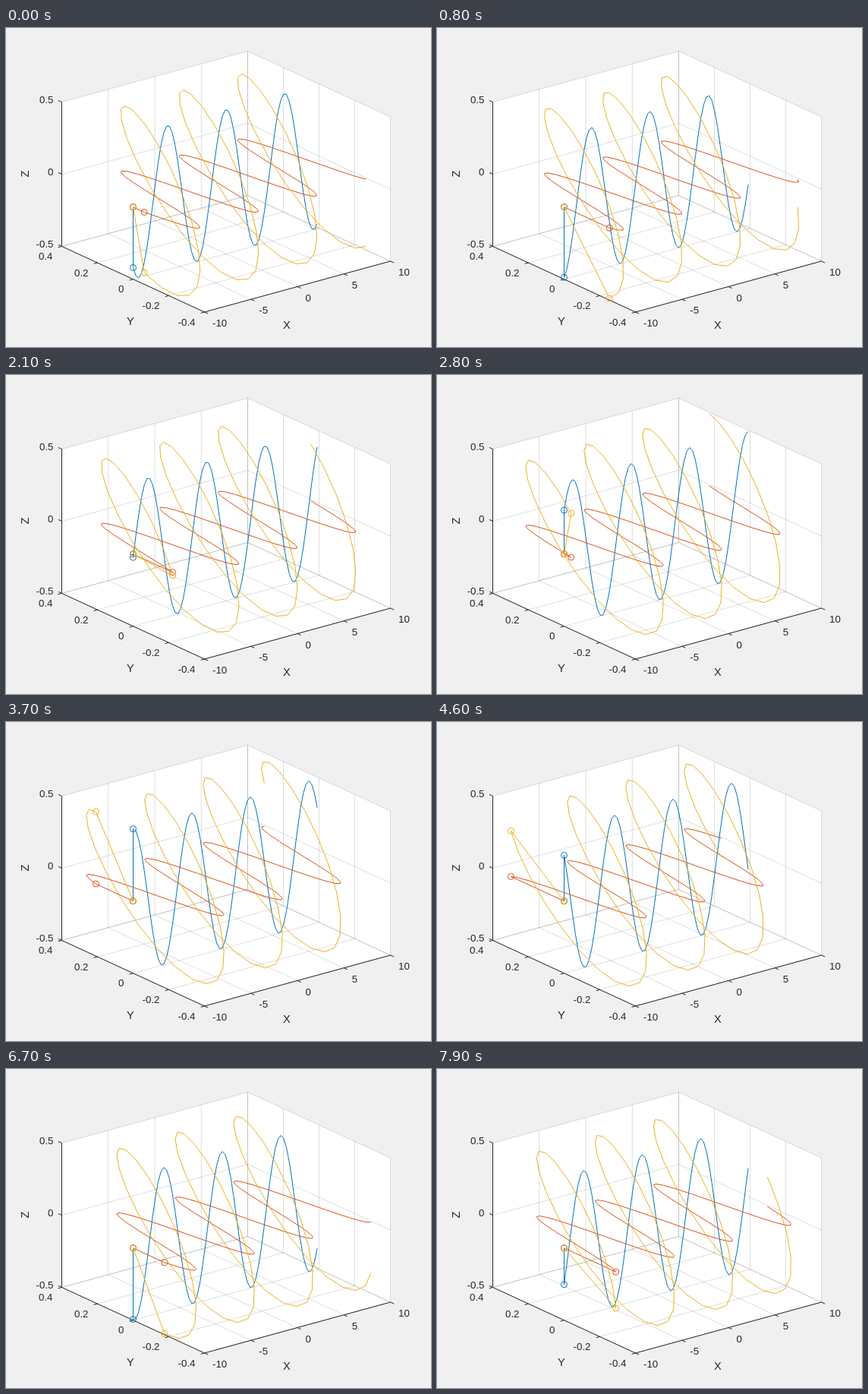
An HTML page that plays this animation: 560x420 px, repeating every 8000 ms.

```html
<!DOCTYPE html>
<html lang="en">
<head>
<meta charset="utf-8">
<title>Elliptically polarised wave</title>
<style>
html, body { margin: 0; width: 560px; height: 420px; overflow: hidden; background: #f0f0f0; }
svg { display: block; fill: none; }
text { font: 13.33px "Liberation Sans", Arial, sans-serif; fill: #262626; dominant-baseline: central; }
.name { font-size: 14.67px; text-anchor: middle; }
</style>
</head>
<body>
<svg width="560" height="420">
  <path id="box" fill="#fff"/>
  <g id="grid" stroke="#262626" stroke-opacity=".15"></g>
  <g id="axes" stroke="#262626"></g>
  <g id="labels">
    <text class="name" x="370" y="391">X</text>
    <text class="name" x="164" y="386">Y</text>
    <text class="name" transform="translate(25 192) rotate(-90)">Z</text>
  </g>
  <g id="waves" stroke-linejoin="round"></g>
</svg>
<script>
const $ = id => document.getElementById(id);

function add(parent, tag, attrs) {
  const el = document.createElementNS("http://www.w3.org/2000/svg", tag);
  for (const key in attrs) el.setAttribute(key, attrs[key]);
  return parent.appendChild(el);
}

// Orthographic view of x -10..10, y -0.4..0.4, z -0.5..0.5
const project = (x, y, z) => {
  const u = (x + 10) / 20, v = (0.4 - y) / 0.8;
  return [73.5 + 245 * u + 188 * v, 287.5 - 67 * u + 86.5 * v - 190 * (z + 0.5)];
};
const path = points => "M" + points.map(p => p.map(c => c.toFixed(2))).join("L");
const line = (group, ...points) => add(group, "path", { d: path(points) });

function label(text, [x, y], anchor) {
  add($("labels"), "text", { x, y, "text-anchor": anchor }).textContent = text;
}
function tick([x, y], dx, dy) {
  line($("axes"), [x, y], [x + dx, y + dy]);
}

const left = project(-10, 0.4, -0.5), front = project(-10, -0.4, -0.5),
      right = project(10, -0.4, -0.5), leftTop = project(-10, 0.4, 0.5);
$("box").setAttribute("d", path([left, leftTop, project(10, 0.4, 0.5),
  project(10, -0.4, 0.5), right, front]) + "Z");

for (const x of [-10, -5, 0, 5, 10]) {
  const a = project(x, 0.4, -0.5), b = project(x, -0.4, -0.5);
  line($("grid"), project(x, 0.4, 0.5), a);
  line($("grid"), a, b);
  tick(b, 4.7, 2.1);
  label(x, [b[0] + 10.5, b[1] + 14.5], "start");
}
for (const y of [0.4, 0.2, 0, -0.2, -0.4]) {
  const a = project(10, y, -0.5), b = project(-10, y, -0.5);
  line($("grid"), project(10, y, 0.5), a);
  line($("grid"), a, b);
  tick(b, -4.8, 1.3);
  label(y, [b[0] - 12, b[1] + 13], "end");
}
for (const z of [-0.5, 0, 0.5]) {
  const a = project(-10, 0.4, z), b = project(10, 0.4, z);
  line($("grid"), a, b);
  line($("grid"), b, project(10, -0.4, z));
  tick(a, -4.6, -2.1);
  label(z, [a[0] - 11, a[1] - 3.5], "end");
}
line($("axes"), leftTop, left, front, right);

// Each wave shows the y and/or z component of the field
const origin = project(-10, 0, 0);
const waves = [["#0072bd", 0, 1], ["#d95319", 1, 0], ["#edb120", 1, 1]].map(([stroke, hasY, hasZ]) => {
  const group = add($("waves"), "g", { stroke });
  const ring = ([cx, cy]) => add(group, "circle", { cx, cy, r: 4 });
  ring(origin);
  return { hasY, hasZ, curve: add(group, "path"), arm: add(group, "path"), tip: ring(origin) };
});

const STEP_MS = 100, STEPS = 80;
let shown = -1;

function draw(step) {
  const t = step * 0.1;
  for (const { hasY, hasZ, curve, arm, tip } of waves) {
    const points = Array.from({ length: 67 }, (_, i) => {
      const x = -10 + 0.3 * i;
      return project(x, hasY * 0.3 * Math.cos(x + t - Math.PI / 4), hasZ * 0.5 * Math.cos(x + t));
    });
    curve.setAttribute("d", path(points));
    arm.setAttribute("d", path([origin, points[0]]));
    tip.setAttribute("cx", points[0][0]);
    tip.setAttribute("cy", points[0][1]);
  }
}

const start = performance.now();
function frame() {
  const step = Math.floor((performance.now() - start) / STEP_MS) % STEPS;
  if (step !== shown) draw(shown = step);
  requestAnimationFrame(frame);
}
frame();
</script>
</body>
</html>
```
